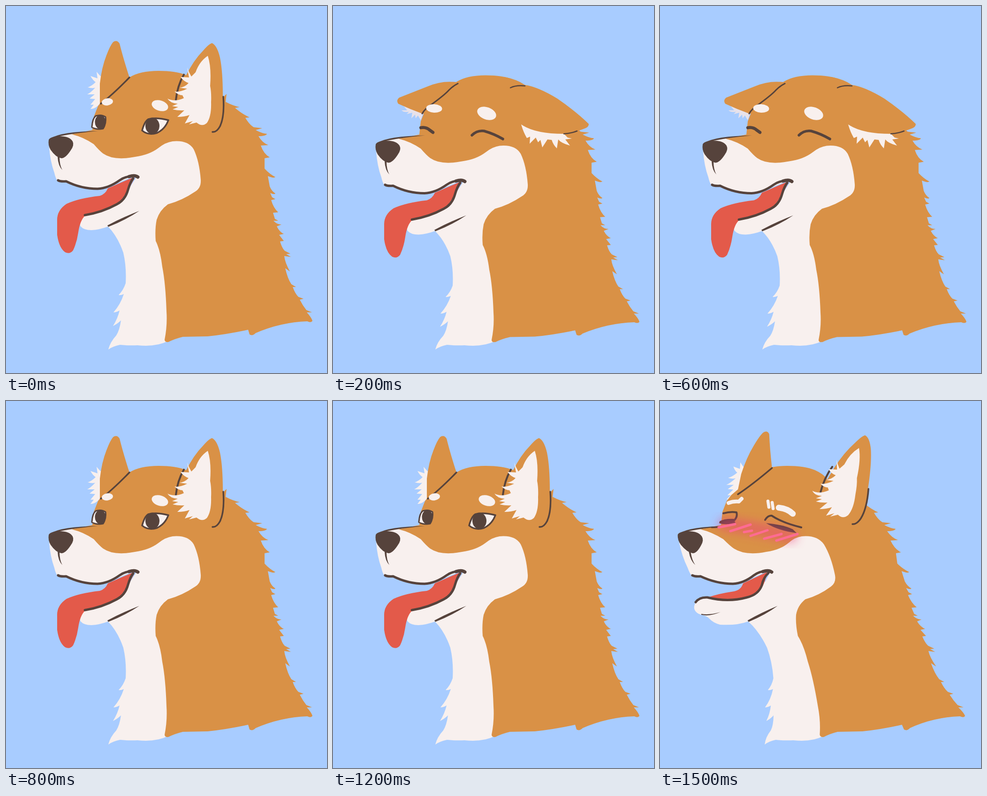
Write an HTML page that moves like this. It is 684x781 px and loops after 2.5 s.

```html
<!DOCTYPE html>
<html lang="en">
<head>
<meta charset="utf-8">
<title>Happy dog</title>
<style>
  html, body { margin: 0; width: 100%; height: 100%; overflow: hidden; background: #a8ccff; }
  svg { display: block; width: 100vw; height: 100vh; }
  .pose { visibility: hidden; animation: 2500ms step-end infinite; }
  #alert { animation-name: alert; }
  #happy { animation-name: happy; }
  #shy { animation-name: shy; }
  @keyframes alert {
    0%, 16%, 32%, 48% { visibility: visible; }
    8%, 24%, 40%, 60%, 100% { visibility: hidden; }
  }
  @keyframes happy {
    0%, 16%, 32%, 48%, 100% { visibility: hidden; }
    8%, 24%, 40% { visibility: visible; }
  }
  @keyframes shy {
    0% { visibility: hidden; }
    60%, 100% { visibility: visible; }
  }
</style>
</head>
<body>
<svg viewBox="0 0 684 781">
  <defs>
    <filter id="soft" x="-30%" y="-100%" width="160%" height="300%">
      <feGaussianBlur stdDeviation="10"/>
    </filter>
  </defs>
  <g class="pose" id="alert"></g>
  <g class="pose" id="happy"></g>
  <g class="pose" id="shy"></g>
</svg>
<script>
const TAN = '#d99146', WHITE = '#f8f0ee', DARK = '#56433c', RED = '#e35a4a';

// Shapes shared by all poses
const chest = `M140,271 L105,277 L92,300 Q94,330 103,355 Q106,368 110,372
  Q128,373 152,384 Q190,392 218,385 L268,364 L278,364 L245,415 L217,469
  Q238,490 250,525 Q257,555 255,590 Q250,605 240,615 Q245,616 251,613 Q244,635 229,652
  Q235,652 242,648 Q238,665 228,681 Q238,676 245,669 Q242,690 235,701 Q222,715 218,731
  Q228,724 243,721 Q262,723 280,722 Q320,726 345,713 L420,560 L420,290 L250,260 Z`;

const coatFront = `M140,273 L184,264 L187,236 L196,213 L206,200 L263,152 Q285,138 325,138
  Q362,138 384,147 Q402,155 410,166 L440,200 L463,206`;
const furTop = `L465,192 L470,187 L468,204 Q485,213 498,215 L488,217 Q505,231 519,237
  L510,238 Q519,253 528,258 L546,260 L532,264 Q545,271 556,272 Q554,277 538,277
  Q546,291 559,296 L543,297 Q549,315 562,322 L551,324 L551,346 Q562,358 574,364
  Q570,367 558,362 L562,384 Q566,394 574,399 Q572,402 563,398`;
const furLow = `L567,407 L574,411 L565,413 Q570,430 580,439 L569,440 L573,453 L580,457 L570,457
  Q577,465 587,465 L577,469 Q583,481 592,485 L582,487 L592,500 L584,501 Q588,515 594,521
  L606,527 L597,528 L607,534 L593,532 Q594,545 605,565 L595,558 Q600,580 608,592
  L618,598 L611,598 Q616,612 623,619 L634,623 L626,625 Q632,637 640,647 L652,652 L641,652
  Q651,663 653,670 Q650,675 642,671 Q585,673 532,696 Q525,703 519,699 L516,689
  Q470,699 430,703 L377,704 Q360,708 346,715 Q338,716 338,710`;
const coatEdge = `Q344,680 342,650 Q340,590 333,555 Q329,520 319,500 Q317,475 321,455
  Q327,435 345,422 Q375,414 403,395 Q416,387 415,370 Q412,330 400,305 Q388,285 355,288
  Q340,290 325,302 Q305,317 275,321 Q230,330 207,314 Q199,308 187,294 Q165,279 140,273 Z`;
const coat = coatFront + furTop + furLow + coatEdge;

const nose = `M91,285 Q93,279 110,277 Q135,276 142,288 Q146,296 138,307 Q127,324 118,324
  Q106,322 95,306 Q89,296 91,285 Z`;
const bridge = 'M94,282 Q118,267 196,266 Q150,270 115,277 Z';
const philtrum = 'M110,321 Q111,340 120,349 Q114,338 114,321 Z';
const chinLine = 'M216,467 Q248,450 284,436 Q256,455 218,470 Z';
const upperLip = 'M111,371 Q116,374 128,373 Q160,389 195,389 Q218,388 242,371 Q255,362 275,361';
const lipCorner = 'M262,363 Q275,359 281,364';

// Upright ears
const farEar = `M200,208 L200,165 Q204,130 214,105 Q222,84 228,77 Q236,71 242,80
  Q250,112 263,152 L206,204 Z`;
const farFold = 'M202,208 Q228,188 263,152';
const farTuft = `M206,152 L200,148 L193,140 L195,154 L180,149 Q185,158 191,162 Q182,171 174,173
  Q183,176 190,174 Q180,185 173,188 Q184,188 189,188 L178,197 L190,198 L180,210
  L187,210 L180,219 Q188,219 195,213 L206,202 Z`;
const nearEar = `M383,149 Q400,115 420,95 Q433,80 439,79 Q450,84 456,110 Q462,140 462,190
  L464,225 Q460,262 444,269 L385,250 L362,198 Z`;
const nearFold = 'M379,146 Q365,170 362,200';
const nearBack = 'M463,193 Q466,235 456,256 Q449,269 440,268';
const nearTuft = `M430,106 Q412,118 404,141 L395,150 Q390,142 386,131 L390,152 L372,151
  Q378,160 389,164 Q382,172 370,174 L386,176 Q370,184 359,182 Q368,190 376,190 L379,196
  Q360,205 344,197 Q350,207 366,208 L354,213 L367,215 L355,220 Q368,223 380,222 L365,236
  Q380,236 391,232 L381,250 L398,245 L390,252 L406,248 Q418,258 428,249 Q438,235 437,205
  Q438,185 435,170 Q438,130 430,106 Z`;

// Moves every "x,y" pair of a path
const warp = (d, move) => d.replace(/([\d.]+),([\d.]+)/g, (_, x, y) =>
  move(+x, +y).map(v => v.toFixed(1)).join());
const stay = (x, y) => [x, y];
const drop = (x, y) => [x, y + 9.5];
const sink = (x, y) => [x, y + 9.5 * Math.max(0, Math.min(1, (720 - y) / 250))];
const lean = (x, y) => [x + Math.max(-54, 0.131 * (y - 692)), y];
const leanFar = (x, y) => [x - 8 - 0.209 * (y - 74), y - 9.5];
const leanNear = (x, y) => [x - 30 - 0.147 * (y - 269), y - 6];

const fill = (d, color) => `<path d="${d}" fill="${color}"/>`;
const line = (d, width, color = DARK, extra = '') => `<path d="${d}" fill="none" stroke="${color}"
  stroke-width="${width}" stroke-linecap="round" stroke-linejoin="round" ${extra}/>`;
const oval = (x, y, rx, ry, turn, color) => `<ellipse rx="${rx}" ry="${ry}" fill="${color}"
  transform="translate(${x} ${y}) rotate(${turn})"/>`;

function dog({ move, jaw, tongue, lowerLip, back, front }) {
  const at = d => warp(d, move);
  return back + fill(at(chest), WHITE) + fill(jaw, WHITE) + fill(at(coat), TAN) +
    fill(at(bridge), DARK) + fill(at(nose), DARK) + fill(at(philtrum), DARK) +
    fill(tongue, RED) + line(lowerLip, 5) + line(at(upperLip), 5) +
    line(at(lipCorner), 7) + fill(at(chinLine), DARK) + front;
}

const uprightFar = move => fill(warp(farEar, move), TAN) + line(warp(farFold, move), 3.5);
const uprightNear = move => fill(warp(nearEar, move), TAN) + line(warp(nearFold, move), 4) +
  fill(warp(nearTuft, move), WHITE) + line(warp(nearBack, move), 3.5);

const jaw = 'M250,410 L168,446 Q154,460 159,469 Q166,477 182,477 Q200,476 218,469 L260,440 Z';
const tongue = `M270,365 L217,388 Q212,400 200,404 Q155,409 129,421 Q108,435 109,457 L109,487
  Q113,515 126,524 Q136,529 143,520 Q151,503 154,482 Q158,455 169,446 Q215,436 245,414
  Q259,395 274,366 Z`;
const lowerLip = 'M271,367 Q265,374 260,391 Q254,413 236,422 Q205,439 168,445';

const farEye = 'M183,258 Q184,240 191,234 Q203,230 212,236 Q214,250 207,261 Q193,264 183,258 Z';
const nearEye = 'M290,265 Q295,246 303,241 Q320,236 346,243 Q339,262 322,270 Q303,276 290,265 Z';
const alertEyes =
  fill(farEye, WHITE) + oval(201, 247, 11.5, 15, 0, DARK) + line(farEye, 3) +
  fill(nearEye, WHITE) + oval(312, 255, 15, 17.5, 0, DARK) + line(nearEye, 3.5);

document.getElementById('alert').innerHTML = dog({
  move: stay, jaw, tongue, lowerLip,
  back: fill(farTuft, WHITE),
  front: uprightFar(stay) + uprightNear(stay) + alertEyes +
    oval(216, 204, 12, 7.5, -8, WHITE) + oval(328, 212, 18, 11, 17, WHITE)
});

const foldedFar =
  fill('M268,163 Q235,157 202,171 L141,195 Q134,201 139,208 Q165,220 190,229 L215,230 Z', TAN) +
  line('M190,229 Q196,218 212,208 Q238,189 247,179 Q256,170 266,165', 3);
const foldedNear =
  fill(`M365,151 Q392,156 409,168 Q437,172 478,197 Q520,226 545,251 Q545,257 538,260
    Q510,271 492,273 Q445,276 401,253 L375,180 Z`, TAN) +
  fill(`M401,252 Q430,272 492,272 L500,280 L509,282 L495,284 L505,297 Q486,292 480,284
    L477,303 Q469,295 466,285 L457,284 L446,301 L442,285 L437,290 L432,280 L419,293
    L420,278 L413,281 Q405,267 401,252 Z`, WHITE) +
  line('M378,174 Q390,168 409,170', 2.5) + line('M492,272 Q508,271 520,266', 2.5);

document.getElementById('happy').innerHTML = dog({
  move: sink,
  jaw: warp(jaw, drop),
  tongue: warp(tongue, drop),
  lowerLip: warp(lowerLip, drop),
  back: fill(`M150,212 L158,222 L146,222 Q151,227 162,225 L157,230 L169,227 L167,239
    L175,231 L176,239 L181,233 L187,243 L192,228 Z`, '#e8e2ea'),
  front: foldedFar + foldedNear +
    oval(215.5, 218, 17, 9, 3, WHITE) + oval(327.5, 228.5, 21, 13, 20, WHITE) +
    line('M187,259 Q198,257 206,264 L213,269', 6.5) +
    line('M296,275 Q307,264 322,266 Q343,272 362,283', 5.5)
});

const streaks = ['M125,269 L160,262', 'M150,277 L193,263', 'M179,279 L196,276',
  'M193,287 L229,275', 'M222,293 L259,283', 'M248,297 L293,283'];
const shyFace =
  line('M146,217 Q156,213 168,214 L174,208', 8, WHITE) +
  line('M230,213 L232,226 M239,216 L241,229', 6.5, WHITE) +
  line('M253,227 Q272,229 283,240', 12.5, WHITE) +
  line('M110,269 Q147,268 159,258', 3) +
  line('M135,239 Q150,235 163,237 Q166,248 156,256', 4) +
  fill('M127,256 Q137,250 159,251 L154,261 Q137,264 126,260 Z', DARK) +
  line('M224,253 Q230,243 238,244 Q260,259 301,269', 4) +
  fill('M226,260 Q262,263 283,273 L291,281 Q255,277 226,260 Z', DARK) +
  line('M138,262 Q205,270 279,288', 27, '#ec3d78', 'opacity=".5" filter="url(#soft)"') +
  streaks.map(d => line(d, 5, '#ff6b93')).join('');

document.getElementById('shy').innerHTML = dog({
  move: lean,
  jaw: `M75,430 Q82,417 101,418 Q145,427 183,418 Q210,411 219,386 L245,380 L240,440 L188,469
    Q165,478 128,476 Q113,472 105,463 Q98,456 85,454 Q71,448 73,436 Z`,
  tongue: `M105,417 Q125,410 158,405 Q173,402 177,388 L228,364 Q222,402 202,411
    Q155,429 105,417 Z`,
  lowerLip: 'M76,428 Q84,417 101,418 Q145,429 185,418 Q210,412 217,392 Q220,376 231,366',
  back: fill(warp(farTuft, leanFar), WHITE),
  front: fill('M88,453 Q106,456 129,449 Q106,459 88,455 Z', DARK) +
    uprightFar(leanFar) + uprightNear(leanNear) + shyFace
});
</script>
</body>
</html>
```
